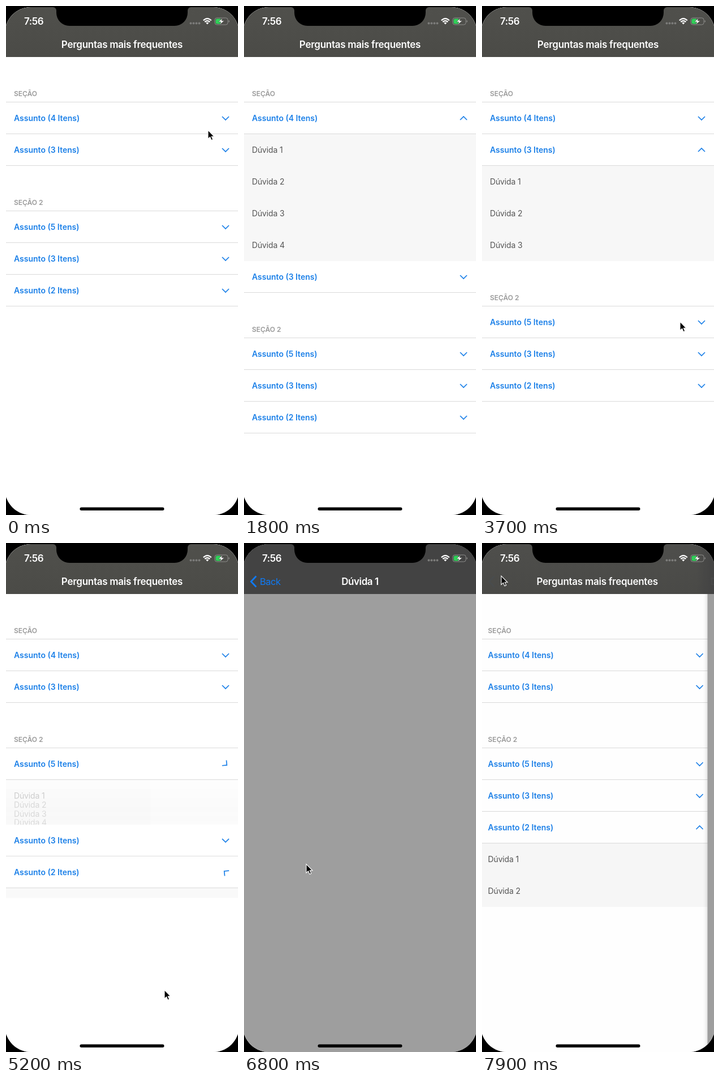
Write an HTML page that moves like this. It is 410 px wide and 898 px high and loops after 8000 ms.

```html
<!DOCTYPE html>
<html lang="pt">
<head>
<meta charset="utf-8">
<title>Perguntas mais frequentes</title>
<style>
  html, body { margin: 0; width: 100%; height: 100%; overflow: hidden; background: #000; }
  #stage { position: relative; width: 410px; height: 898px; overflow: hidden; background: #000;
    font: 14px Inter, "Open Sans", sans-serif; letter-spacing: -.15px; white-space: nowrap; }
  #stage div { position: absolute; }
  #screen { left: -2px; top: 2px; width: 414px; height: 896px; border-radius: 46px; overflow: hidden; }
  #view { left: 2px; top: -2px; width: 410px; height: 898px; background: #fff; overflow: hidden; }
  #list, #dim, #page { left: 0; top: 0; width: 410px; height: 898px; }
  #list { background: #fff; isolation: isolate; }
  #dim { background: #000; }
  #page { background: #9e9e9e; box-shadow: 0 0 9px rgba(0, 0, 0, .25); }
  .row, .item, .group { left: 0; width: 410px; box-sizing: border-box; padding-left: 14px; }
  .row, .item { height: 56px; line-height: 56px; }
  .row, .group { background: #fff; z-index: 10; }
  .row { color: #1c80e8; font-weight: 600; letter-spacing: 0; }
  .row::after, .group::after { content: ""; position: absolute; left: 0; right: 0; bottom: 0; height: 1px; background: #dadada; }
  .item { background: #f7f7f7; color: #555; }
  .group { height: 80px; padding-top: 50px; line-height: 30px; font-size: 12px; font-weight: 600; letter-spacing: 0; color: #9a9a9a; }
  .row svg { position: absolute; left: 378px; top: 18px; }
  #bar { left: 0; top: 0; width: 410px; height: 90px; overflow: hidden; background: linear-gradient(#50504c, #4b4b47); }
  #tint, #shade { left: 0; top: 0; width: 410px; height: 90px; }
  #tint { background: linear-gradient(#4b4b4b, #464646); }
  #shade { left: -20px; width: 430px; background: linear-gradient(90deg, transparent, #434343 30px); }
  #bar .big { font-size: 17px; font-weight: 600; letter-spacing: -.43px; line-height: 30px; color: #fff; }
  #title, #detail { left: 0; width: 410px; top: 53px; text-align: center; }
  #bar #title { letter-spacing: -.27px; }
  #bar #label { left: 28px; top: 53px; font-size: 16.5px; font-weight: 400; letter-spacing: -.5px; color: #0f7af5; }
  #clock { left: 32px; top: 12px; }
  #stage > svg, #arrow { position: absolute; left: 0; top: 0; }
</style>
</head>
<body>
<div id="stage">
  <div id="screen"><div id="view">
    <div id="list"></div>
    <div id="dim"></div>
    <div id="page"></div>
    <div id="bar">
      <div id="tint"></div>
      <div id="shade"></div>
      <div id="title" class="big">Perguntas mais frequentes</div>
      <div id="detail" class="big">Dúvida 1</div>
      <svg id="arrow" width="40" height="90" fill="none" stroke="#0f7af5" stroke-width="2.8"><path d="M21.500 58.500L12.500 68L21.500 77.500"/></svg>
      <div id="label" class="big">Back</div>
      <div id="clock" class="big">7:56</div>
    </div>
  </div></div>
  <svg width="410" height="898">
    <path d="M83 0V2A6 6 0 0 1 89 8V12A23 23 0 0 0 112 35H298A23 23 0 0 0 321 12V8A6 6 0 0 1 327 2V0Z"/>
    <rect x="130.500" y="884.600" width="149" height="5.400" rx="2.700"/>
    <g fill="#7c7c7a"><circle cx="326.500" cy="30.500" r="2"/><circle cx="331.500" cy="30.500" r="2"/><circle cx="336.500" cy="30.500" r="2"/><circle cx="341.500" cy="30.500" r="2"/></g>
    <g fill="none" stroke="#fff" stroke-width="2.300">
      <path d="M348.800 25.500Q355.800 18.700 362.800 25.500M351.300 28.200Q355.800 24 360.300 28.200"/>
      <path d="M353.300 29.800Q355.800 27.800 358.300 29.800L355.800 32.500Z" fill="#fff" stroke="none"/>
    </g>
    <rect x="369" y="21" width="23" height="12" rx="3.500" fill="none" stroke="#8d8d8b"/>
    <path d="M393.500 25V29Q395 28.500 395 27T393.500 25Z" fill="#8d8d8b"/>
    <path d="M373 22.500H379V31.500H373Q370.500 31.500 370.500 29V25Q370.500 22.500 373 22.500Z" fill="#2fd158"/>
    <path d="M382.500 21.500L375.500 28H379.800L378.300 32.500L385.500 26H381Z" fill="#fff" stroke="#4a4a48" stroke-width=".6"/>
    <g id="cursor"><path d="M0 0V15.500L3.600 12.200L6 17.800L8.700 16.600L6.300 11.300H11Z" stroke="#fff" stroke-width="1.100"/></g>
  </svg>
</div>
<script>
const LOOP = 8000, ROW = 56, GROUP = 80, FOLD = 480;
const counts = [4, 3, 5, 3, 2];
// Time at which each section opens, closing the one before it
const taps = [[980, 0], [2706, 1], [3720, 2], [4889, 4]];
const PUSH = 6264, POP = 7566;
const path = [
  [100, 357, 219], [600, 381, 197], [2000, 381, 197], [2500, 379, 470], [3300, 379, 470],
  [3650, 350, 557], [4300, 350, 557], [4650, 284, 803], [4850, 280, 788.5], [5400, 280, 788.5],
  [6000, 110, 566.5], [6900, 110, 566.5], [7400, 34, 58]
];

const $ = id => document.getElementById(id);
const mix = (a, b, p) => a + (b - a) * p;
const clamp = p => Math.min(1, Math.max(0, p));
const smooth = p => p * p * (3 - 2 * p);
const moveTo = (el, x, y) => el.style.transform = `translate(${x}px, ${y}px)`;

function add(cls, html) {
  const el = document.createElement('div');
  el.className = cls;
  el.innerHTML = html;
  $('list').append(el);
  return el;
}

// Earlier items lie above later ones while a section folds
function addItem(i) {
  const el = add('item', `Dúvida ${i + 1}`);
  el.style.zIndex = 9 - i;
  return el;
}

const chevron = '<svg width="20" height="20" fill="none" stroke="#1c80e8" stroke-width="1.700"><path d="M4 7L10 13L16 7"/></svg>';
const items = counts.map(n => Array.from({ length: n }, (_, i) => addItem(i)));
const groups = ['SEÇÃO', 'SEÇÃO 2'].map(name => add('group', name));
const rows = counts.map(n => add('row', `Assunto (${n} Itens)${chevron}`));
const marks = rows.map(row => row.querySelector('svg'));

function layout(open) {
  const tops = [], heads = [];
  let y = 90;
  counts.forEach((n, k) => {
    if (k === 0 || k === 2) { heads.push(y); y += GROUP; }
    tops.push(y);
    y += ROW * (k === open ? n + 1 : 1);
  });
  return { tops, heads };
}

function drawList(t) {
  let from = -1, to = -1, p = 1;
  for (const [start, section] of taps) {
    if (t < start) break;
    from = to;
    to = section;
    p = smooth(clamp((t - start) / FOLD));
  }
  const a = layout(from), b = layout(to);
  groups.forEach((el, i) => moveTo(el, 0, mix(a.heads[i], b.heads[i], p)));
  rows.forEach((el, k) => {
    moveTo(el, 0, mix(a.tops[k], b.tops[k], p));
    const turn = k === to ? 180 * p : k === from ? 180 + 180 * p : 0;
    marks[k].style.transform = `rotate(${turn}deg)`;
    const shown = k === to ? p : k === from ? 1 - p : 0;
    items[k].forEach((item, i) => {
      item.style.opacity = shown;
      moveTo(item, 0, b.tops[k] + ROW + ROW * i * shown);
    });
  });
}

// Critically damped spring
function spring(ms) {
  const u = Math.max(0, ms) * .016;
  return Math.min(1, 1.002 * (1 - (1 + u) * Math.exp(-u)));
}

function drawPages(t) {
  const p = t < POP ? spring(t - PUSH) : 1 - spring(t - POP);
  const x = 410 * (1 - p);
  moveTo($('list'), -123 * p, 0);
  $('dim').style.opacity = .1 * p;
  moveTo($('page'), x, 0);
  $('page').style.visibility = p > 0 ? 'visible' : 'hidden';
  moveTo($('shade'), x, 0);
  $('shade').style.opacity = p > 0 ? 1 : 0;
  $('tint').style.opacity = clamp(p * 10);
  moveTo($('title'), -50 * p, 0);
  $('title').style.opacity = 1 - p;
  moveTo($('detail'), 238 * (1 - p), 0);
  $('detail').style.opacity = p;
  $('arrow').style.opacity = p;
  moveTo($('label'), 50 * (1 - p), 0);
  $('label').style.opacity = p * p;
}

function drawCursor(t) {
  const next = path.findIndex(k => k[0] > t);
  const b = path[next < 0 ? path.length - 1 : next];
  const a = next > 0 ? path[next - 1] : b;
  const p = a === b ? 1 : smooth((t - a[0]) / (b[0] - a[0]));
  $('cursor').setAttribute('transform', `translate(${mix(a[1], b[1], p)} ${mix(a[2], b[2], p)})`);
  $('cursor').style.visibility = t >= 1800 && t < 2000 ? 'hidden' : 'visible';
}

const begin = performance.now();
function frame() {
  const t = (performance.now() - begin) % LOOP;
  drawList(t);
  drawPages(t);
  drawCursor(t);
  requestAnimationFrame(frame);
}
frame();
</script>
</body>
</html>
```
